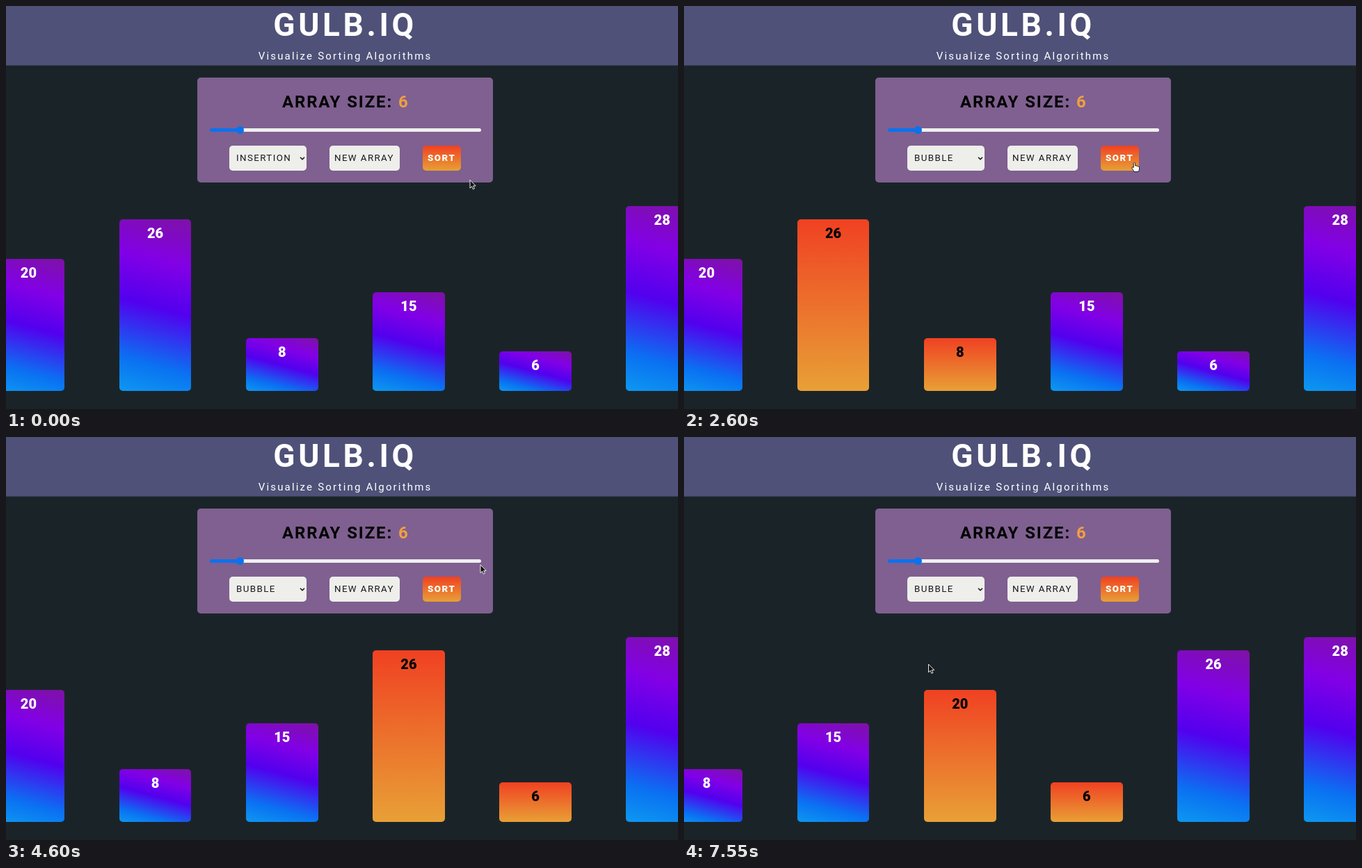
Write an HTML page that moves like this. It is 966x580 px and loops after 8 s.

```html
<!DOCTYPE html>
<html lang="en">
<head>
<meta charset="utf-8">
<title>Sorting visualizer</title>
<style>
html, body { margin: 0; width: 100%; height: 100%; overflow: hidden; background: #1a2428; }
#stage { position: relative; width: 966px; height: 580px; overflow: hidden; font-family: Roboto, sans-serif; white-space: nowrap; }
#stage div, #stage svg { position: absolute; box-sizing: border-box; }
header { position: absolute; box-sizing: border-box; width: 966px; height: 86px; background: #4f5178; border-bottom: 1px solid #3a3f56; color: #fff; }
.line { left: 0; width: 975.2px; text-align: center; }
.title { top: -3px; line-height: 60px; font-size: 46px; font-weight: 700; letter-spacing: 4.6px; }
.sub { top: 62px; line-height: 20px; font-size: 15px; letter-spacing: 2.18px; }
.panel { left: 275px; top: 103px; width: 425px; height: 151px; border-radius: 5px; background: #7f6090; }
#stage .size { left: .7px; top: 123px; line-height: 30px; font-size: 24px; font-weight: 700; letter-spacing: 1.87px; color: #000; }
.size span { color: #f0a040; }
.track { left: 293px; top: 176px; width: 390px; height: 5px; border-radius: 3px; background: linear-gradient(90deg, #0a72ee 43px, #efefef 0); }
.thumb { left: 331px; top: 173px; width: 11px; height: 11px; border-radius: 50%; background: #0a72ee; }
.btn { top: 201px; height: 36px; line-height: 36px; border-radius: 5px; background: #eeeeeb; color: #1a1a20; font-size: 13.33px; letter-spacing: 1.4px; text-align: center; }
.select { left: 321px; width: 111px; padding-left: 10px; text-align: left; }
.new { left: 464.5px; width: 101px; }
.sort { left: 598.5px; width: 55.5px; color: #fff; font-weight: 900; letter-spacing: 1.6px; }
.sort, #stage .bar.hot { background: linear-gradient(#f04122, #e8a036); }
.popup { left: 321px; top: 237px; width: 111px; height: 53px; background: #eeeeeb; box-shadow: 0 1px 3px #0006; }
.row { left: 0; width: 111px; height: 17px; line-height: 17px; padding-left: 11.8px; font-size: 13.33px; color: #1a1a20; }
.row.on { background: #0e8aee; color: #fff; }
.bar { width: 103.7px; border-radius: 5px; line-height: 40px; text-align: center; font-size: 20px; font-weight: 800; color: #fff;
  background: linear-gradient(15deg, #0d98f0, #0a72f2 18%, #5200ee 49%, #8200e6 74%, #7e12a6); }
.bar.hot { color: #000; }
#cursor { left: 0; top: 0; width: 20px; height: 20px; overflow: visible; }
</style>
</head>
<body>
<div id="stage">
  <header>
    <div class="line title">GULB.IQ</div>
    <div class="line sub">Visualize Sorting Algorithms</div>
  </header>
  <div class="panel"></div>
  <div class="line size">ARRAY SIZE: <span>6</span></div>
  <div class="track"></div><div class="thumb"></div>
  <div class="btn select"><span id="choice">INSERTION</span>
    <svg style="left:101px;top:16px" width="8" height="6"><path d="M1 .8 4 3.8 7 .8" fill="none" stroke="#111" stroke-width="1.5"/></svg>
  </div>
  <div class="btn new">NEW ARRAY</div>
  <div class="btn sort">SORT</div>
  <div id="bars"></div>
  <div class="popup" id="popup"></div>
  <svg id="cursor">
    <path id="arrow" d="M0 0V11.6L2.6 9.2 4.4 13.2 6.4 12.3 4.7 8.4H8.2Z" fill="#111" stroke="#fff" stroke-width=".9"/>
    <path id="hand" d="M-1.2 7V.6Q0-.9 1.2.6V4.6Q2.4 3.6 3.4 4.9 4.6 4.1 5.4 5.4 7 5 7 6.6V9.4Q6.6 11.5 5.6 13H-.4Q-1.6 10.5-3.7 8.2-4 6.2-2.4 6.4Z" fill="#fff" stroke="#111" stroke-width=".9"/>
  </svg>
</div>
<script>
const LOOP = 8000, TICK = 50;
const OPEN = 1250, HOVER = 1450, CHOOSE = 1800;
const BASE = 554.4, UNIT = 9.5, PITCH = 182.15;
const START = [20, 26, 8, 15, 6, 28];
const swapTimes = [2600, 3600, 4600, 5900, 6550, 7550];

// cursor path: start time, end time, target x and y
const moves = [
  [100, 500, 631, 236],
  [600, 1050, 430, 214.5],
  [1400, 1550, 390, 262],
  [1950, 2300, 647.5, 225.5],
  [2950, 3200, 614, 435.5],
  [3450, 3900, 682, 184],
  [5950, 6250, 351.5, 327]
];

const $ = id => document.getElementById(id);
const add = (parent, cls, text = '') => {
  const el = document.createElement('div');
  el.className = cls;
  el.textContent = text;
  parent.append(el);
  return el;
};

// Bubble sort, recording the array just before every swap.
function bubbleSort(list) {
  const a = [...list], steps = [];
  for (let end = a.length - 1; end > 0; end--) {
    for (let i = 0; i < end; i++) {
      if (a[i] <= a[i + 1]) continue;
      steps.push({ values: [...a], first: i });
      [a[i], a[i + 1]] = [a[i + 1], a[i]];
    }
  }
  return steps;
}

const steps = bubbleSort(START);
const idle = { values: START, first: -9 };

const bars = START.map((_, i) => {
  const el = add($('bars'), 'bar');
  el.style.left = PITCH * i - 19.4 + 'px';
  return el;
});
const rows = ['INSERTION', 'BUBBLE', 'SELECTION'].map((name, i) => {
  const el = add($('popup'), 'row', name);
  el.style.top = 1 + 17 * i + 'px';
  return el;
});

function cursorAt(t) {
  let x = 667, y = 250.5;
  for (const [from, to, tx, ty] of moves) {
    const p = Math.max(0, Math.min(1, (t - from) / (to - from)));
    const e = p * p * (3 - 2 * p);
    x += (tx - x) * e;
    y += (ty - y) * e;
  }
  return [x, y];
}

const overButton = (x, y) =>
  y > 201 && y < 237.5 && (x > 598 && x < 654 || x > 464 && x < 566);

const show = (id, on) => { $(id).style.display = on ? '' : 'none'; };

function render(t) {
  const done = swapTimes.filter(s => s <= t).length;
  const { values, first } = done ? steps[done - 1] : idle;
  bars.forEach((el, i) => {
    const h = values[i] * UNIT;
    el.textContent = values[i];
    el.style.height = h + 'px';
    el.style.top = BASE - h + 'px';
    el.classList.toggle('hot', i === first || i === first + 1);
  });

  show('popup', t >= OPEN && t < CHOOSE);
  rows.forEach((el, i) => el.classList.toggle('on', i === (t < HOVER ? 0 : 1)));
  $('choice').textContent = rows[t < CHOOSE ? 0 : 1].textContent;

  const [x, y] = cursorAt(t);
  const hand = overButton(x, y);
  $('cursor').style.transform = `translate(${x}px, ${y}px)`;
  show('arrow', !hand);
  show('hand', hand);
}

const start = performance.now();
let shown = -1;
function loop() {
  const t = Math.floor((performance.now() - start) % LOOP / TICK) * TICK;
  if (t !== shown) render(shown = t);
  requestAnimationFrame(loop);
}
loop();
</script>
</body>
</html>
```
